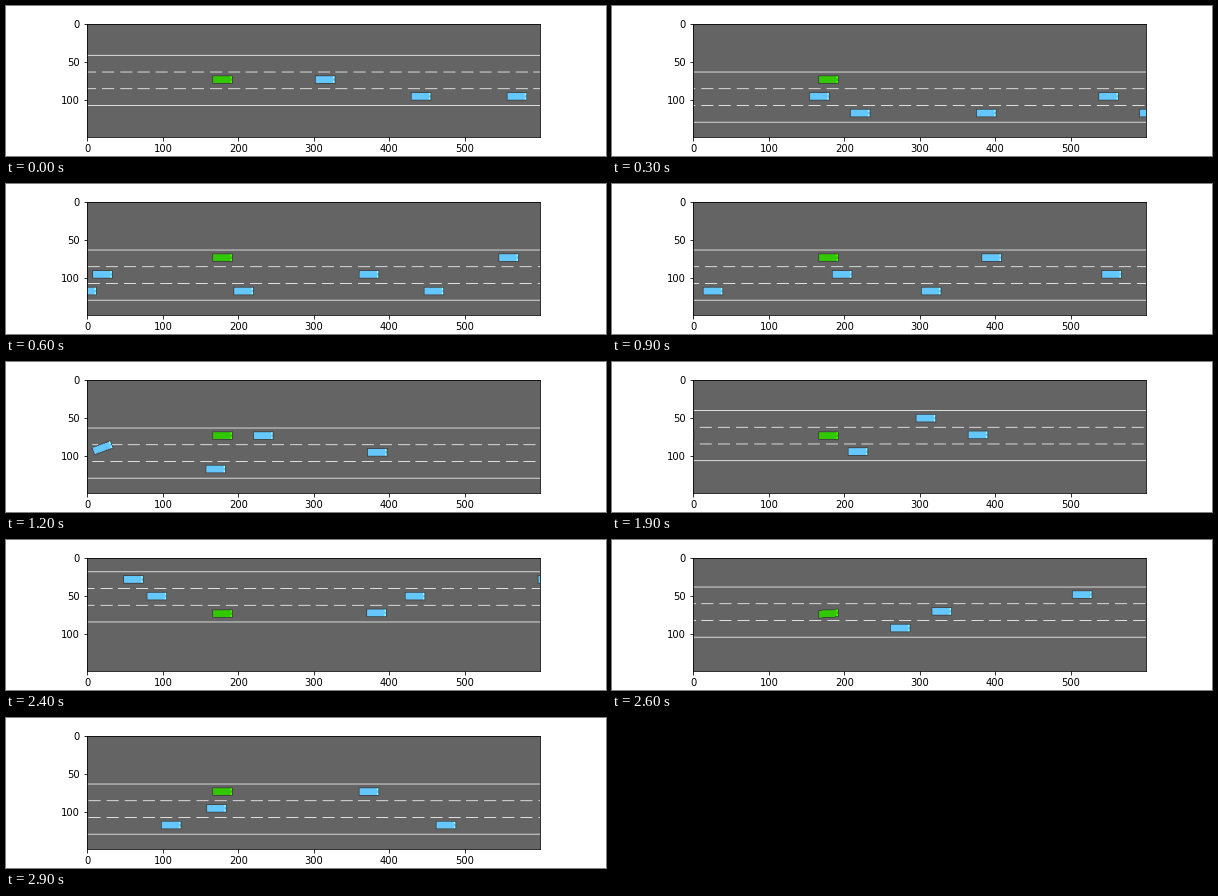
A matplotlib script that plays this animation: 600x150 px, repeating every 3000 ms.

```python
import numpy as np
import matplotlib.pyplot as plt
from matplotlib.animation import FuncAnimation

W, H = 600, 150
FRAMES, INTERVAL = 30, 100
LANE = 22                    # lane width in road pixels
DASH, PERIOD = 16, 23.815    # stripe length and spacing
LINE_TOP, EGO_TOP, EGO_LEFT = 64, 69, 166

ROAD = (100, 100, 100)
WHITE = (255, 255, 255)
EDGE = (60, 60, 60)
GREEN = (50, 200, 0)
BLUE = (100, 200, 255)

# The green car starts in the middle lane; (step, lanes moved down).
CHANGES = [(1, -1), (13, 1), (14, 1), (18, -1), (22, 1), (26, -1), (27, -1)]

# Per lane: left edge at step 0 and how far the car falls back each step.
TRAFFIC = [
    [(870, 54.2), (1235.5, 49.5), (1734.6, 47.4)],
    [(302, 49.2), (1050, 56.6), (1447, 57), (1683.4, 52.6)],
    [(429, 73.8), (556, 60.3), (735.5, 48.2), (1292, 57.2),
     (1675.6, 54.4), (1999, 53)],
]
MERGER, MERGE_STEP = (713, 58.8), 12

rows, cols = np.mgrid[0:H, 0:W]


def ego_pose(i):
    """Lane position and heading from damped responses to each change."""
    lane, heading = 1, 0
    for step, move in CHANGES:
        t = i - step + 1
        if t > 0:
            decay = np.exp(-2 * t)
            lane += move * (1 - decay * np.cos(0.65 * t))
            heading += 25 * move * decay
    return lane, heading


def row_of(base, lanes):
    return int(np.floor(base + LANE * lanes + 1e-6))


def draw_car(img, left, top, color, angle=0):
    a = np.radians(angle)
    dx, dy = cols - (round(left) + 13), rows - (top + 5)
    u = np.rint(dx * np.cos(a) + dy * np.sin(a))
    v = abs(np.rint(dy * np.cos(a) - dx * np.sin(a)))
    body = (abs(u) <= 13) & (v <= 5)
    lights = body & (u >= 11) & (v >= 2)
    img[body] = color
    img[lights] = np.minimum(np.array(color) / 0.68, 255)
    img[body & ((abs(u) == 13) | (v == 5))] = EDGE


def draw_road(img, ego, i):
    start = -4.5 - 3.07 * i
    striped = (np.arange(W) - start) % PERIOD < DASH
    for k in range(4):
        y = row_of(LINE_TOP, k - ego)
        img[y, striped if k in (1, 2) else slice(None)] = WHITE


def scene(i):
    img = np.full((H, W, 3), ROAD, dtype=np.uint8)
    ego, heading = ego_pose(i)
    draw_road(img, ego, i)

    for lane, cars in enumerate(TRAFFIC):
        for x, speed in cars:
            draw_car(img, x - speed * i, row_of(EGO_TOP, lane - ego), BLUE)

    x, speed = MERGER
    t = max(0, i - MERGE_STEP + 1)
    draw_car(img, x - speed * i, row_of(EGO_TOP, 1 - 0.23 * t - ego),
             BLUE, -20 * min(t, 1))

    draw_car(img, EGO_LEFT, EGO_TOP, GREEN, heading)
    return img


fig, ax = plt.subplots(figsize=(W / 72, H / 72), dpi=72)
fig.subplots_adjust(left=0.125, right=0.9, bottom=0.125, top=0.88)
view = ax.imshow(scene(0))


def update(i):
    view.set_data(scene(i))
    return [view]


anim = FuncAnimation(fig, update, frames=FRAMES, interval=INTERVAL,
                     repeat=True, repeat_delay=0)
plt.show()
```
